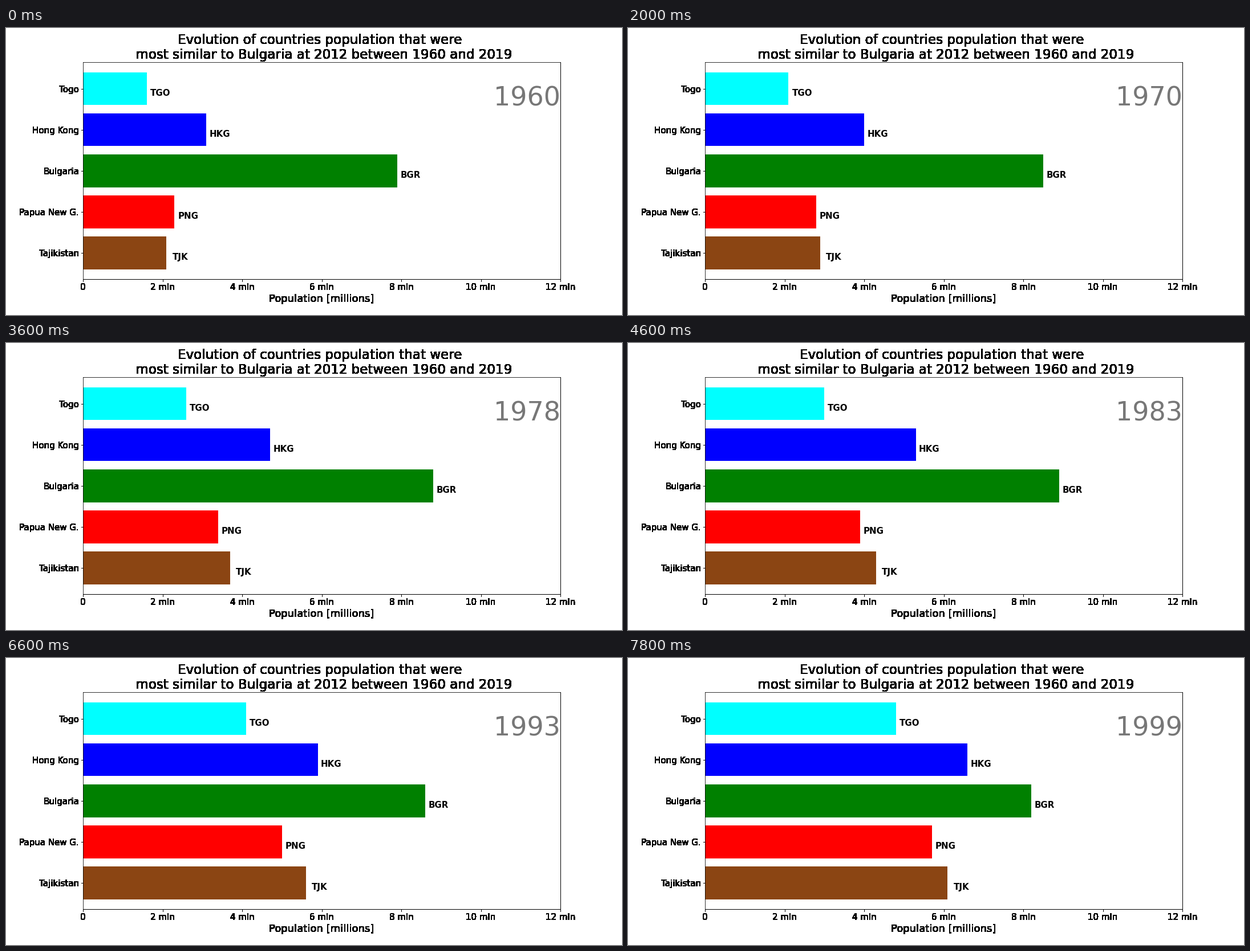
Recreate the animation shown at these times as a matplotlib script. Size 1080x504 px, loop 8000 ms.

```python
import matplotlib.pyplot as plt
import numpy as np
from matplotlib.animation import FuncAnimation

plt.rcParams["font.family"] = "DejaVu Sans"

FIRST_YEAR, YEARS, STEP_MS = 1960, 40, 200
CODE_GAP = 0.34  # from the bar's end to the middle of its code, in millions

# name, code, colour, a few turning points as {year: millions}
COUNTRIES = [
    ("Tajikistan", "TJK", "saddlebrown",
     {1960: 2.09, 1970: 2.92, 1980: 3.92, 1990: 5.28, 1999: 6.14}),
    ("Papua New G.", "PNG", "red",
     {1960: 2.26, 1970: 2.78, 1980: 3.57, 1990: 4.6, 1999: 5.72}),
    ("Bulgaria", "BGR", "green",
     {1960: 7.87, 1970: 8.49, 1976: 8.77, 1988: 8.98, 1990: 8.74, 1999: 8.21}),
    ("Hong Kong", "HKG", "blue",
     {1960: 3.08, 1964: 3.52, 1970: 3.96, 1978: 4.7, 1982: 5.26, 1993: 5.9,
      1996: 6.42, 1999: 6.61}),
    ("Togo", "TGO", "cyan",
     {1960: 1.58, 1964: 1.66, 1980: 2.72, 1990: 3.78, 1996: 4.34, 1999: 4.76}),
]


def population(points, year):
    """Steady growth between turning points, shown to one decimal."""
    return np.round(np.interp(year, list(points), list(points.values())), 1)


def solid(image, dpi):
    """Turn every touched pixel fully black, for hard edges."""
    hard = np.zeros_like(image)
    hard[..., 3] = image[..., 3] > 0
    return hard, 0, 0


fig = plt.figure(figsize=(15, 7), dpi=72, facecolor="white")
ax = fig.add_axes([0.125, 0.125, 0.775, 0.755])
names, labels, colours, growth = zip(*COUNTRIES)
rows = range(len(COUNTRIES))

bars = ax.barh(rows, [0] * len(rows), color=colours)
codes = [ax.text(0, row, label, size=15, weight="bold", ha="center", va="top")
         for row, label in zip(rows, labels)]
year_text = ax.text(1, 0.8, "", transform=ax.transAxes, size=46,
                    color="#777777", ha="right")

ax.set_xlim(0, 12)
ax.set_ylim(-0.64, 4.64)
ax.set_xticks(range(0, 13, 2), ["0"] + [f"{n} mln" for n in range(2, 13, 2)])
ax.set_yticks(rows, names)
ax.tick_params(labelsize=15)
title = ax.set_title("Evolution of countries population that were \n"
                     " most similar to Bulgaria at 2012 between 1960 and 2019",
                     size=23)
xlabel = ax.set_xlabel("Population [millions]", size=18)

for part in [title, xlabel, ax.spines["right"], ax.spines["bottom"],
             *ax.get_xticklabels(), *ax.get_yticklabels(),
             *ax.get_xticklines(), *ax.get_yticklines()]:
    part.set_agg_filter(solid)


def update(frame):
    year = FIRST_YEAR + frame
    for bar, code, points in zip(bars, codes, growth):
        value = population(points, year)
        bar.set_width(value)
        code.set_x(value + CODE_GAP)
    year_text.set_text(str(year))
    return [*bars, *codes, year_text]


anim = FuncAnimation(fig, update, frames=YEARS, interval=STEP_MS,
                     repeat=True, repeat_delay=0, blit=False)
plt.show()
```
